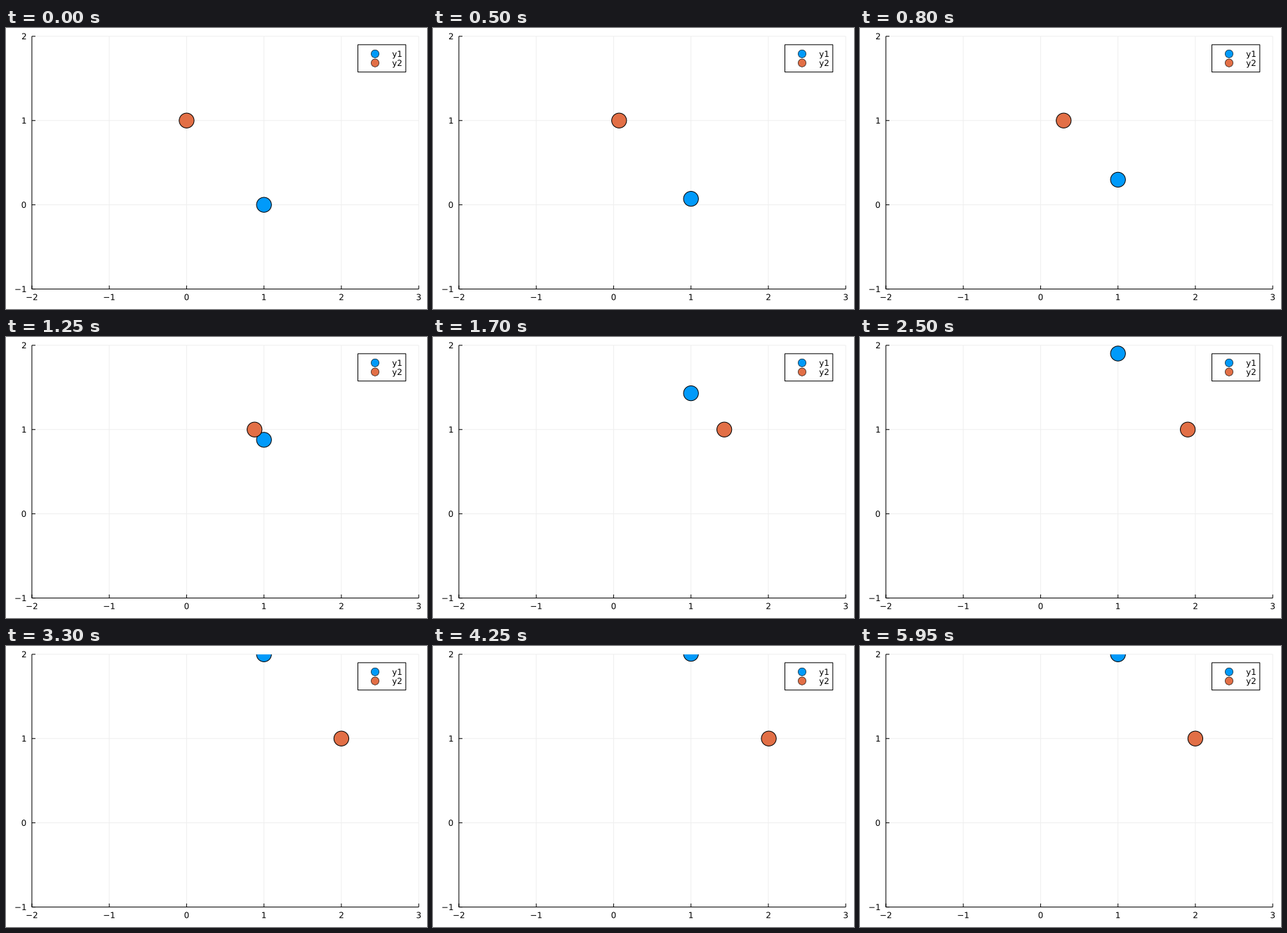
Write a matplotlib script that moves like this. It is 600 px wide and 400 px high and loops after 8000 ms.

```python
import numpy as np
import matplotlib.pyplot as plt
from matplotlib.animation import FuncAnimation
from matplotlib.patches import Circle, PathPatch, Rectangle
from matplotlib.textpath import TextPath
from matplotlib.transforms import Affine2D

W, H, DPI = 600, 400, 100
FRAMES, STEP = 160, 50
LEFT, RIGHT, TOP, BOTTOM = 36.9, 588.19, 11.81, 371.6
BLUE, ORANGE, GRID = "#009AFA", "#E26F46", "#efefef"
PT = 72 / DPI  # points per pixel
CAP = 8.64     # digit height in pixels

plt.rcParams["font.family"] = "DejaVu Sans"
plt.rcParams["path.snap"] = False
fig = plt.figure(figsize=(W / DPI, H / DPI), dpi=DPI, facecolor="white")
ax = fig.add_axes([0, 0, 1, 1])
ax.set_xlim(0, W)
ax.set_ylim(H, 0)
ax.axis("off")


def px(x):
    return LEFT + (x + 2) * (RIGHT - LEFT) / 5


def py(y):
    return BOTTOM - (y + 1) * (BOTTOM - TOP) / 3


def line(xs, ys, color="black", z=3):
    ax.plot(xs, ys, color=color, lw=PT, zorder=z, solid_capstyle="butt")


def label(x, y, text, align):
    # outlines keep subpixel placement; y is the middle of the digits
    path = TextPath((0, 0), text, size=CAP / 0.729)
    box = path.get_extents()
    shift = x - box.x0 - align * box.width
    move = Affine2D().scale(1, -1).translate(shift, y + CAP / 2)
    ax.add_patch(PathPatch(move.transform_path(path), fc="black", lw=0,
                           zorder=6))


def dot(x, y, r, color, edge, z):
    return ax.add_patch(Circle((x, y), r, fc=color, ec="black",
                               lw=edge * PT, zorder=z))


def number(n):
    return str(n).replace("-", "\u2212")


# grid, ticks and axes
for n in range(-2, 4):
    x = px(n)
    line([x, x], [TOP, BOTTOM], GRID, 1)
    line([x, x], [BOTTOM, BOTTOM - 5])
    label(x, 383, number(n), 0.5)
for n in range(-1, 3):
    y = py(n)
    line([LEFT, RIGHT], [y, y], GRID, 1)
    line([LEFT, LEFT + 5], [y, y])
    label(28.4, y, number(n), 1)
line([LEFT, RIGHT], [BOTTOM, BOTTOM])
line([LEFT, LEFT], [TOP, BOTTOM])

# legend, inset by a thirtieth of the plot area
x0, x1 = 501.5, RIGHT - (RIGHT - LEFT) / 30
y0, row = TOP + (BOTTOM - TOP) / 30, 12.96
ax.add_patch(Rectangle((x0, y0), x1 - x0, 3 * row, fc="white", ec="black",
                       lw=PT, zorder=5))
for i, (name, color) in enumerate((("y1", BLUE), ("y2", ORANGE)), 1):
    dot(526, y0 + i * row, 5.6, color, 0.6, 6)
    label(550.6, y0 + i * row, name, 0)

# moving points
area = Rectangle((LEFT, TOP), RIGHT - LEFT, BOTTOM - TOP,
                 transform=ax.transData)
blue = dot(px(1), py(0), 10.6, BLUE, 1.0, 4)
orange = dot(px(0), py(1), 10.6, ORANGE, 1.0, 4)
for ball in (blue, orange):
    ball.set_clip_path(area)

# fourth-order damped step response with a double pole pair -A +/- iB
A, B = 2.153, 1.231
R2 = A * A + B * B
GAIN = R2 * R2 / (2 * B ** 3)
C1 = -GAIN * A * B / R2
S1 = GAIN * B * B / R2
S0 = (A - C1) / B


def position(t):
    t = min(t, 5.95)  # settled
    rest = np.exp(-A * t) * ((1 + C1 * t) * np.cos(B * t)
                             + (S0 + S1 * t) * np.sin(B * t))
    # fading ripple: steeper middle, later overshoot
    u = np.pi * t / 2.5
    ripple = 0.0178 * np.sin(u) ** 2 * np.sin(2 * u) / (1 + (t / 2.6) ** 6)
    return 2 * (1 - rest - ripple)


def update(i):
    s = position(i * STEP / 1000)
    blue.center = px(1), py(s)
    orange.center = px(s), py(1)
    return blue, orange


anim = FuncAnimation(fig, update, frames=FRAMES, interval=STEP,
                     repeat=True, repeat_delay=0, blit=False)
plt.show()
```
